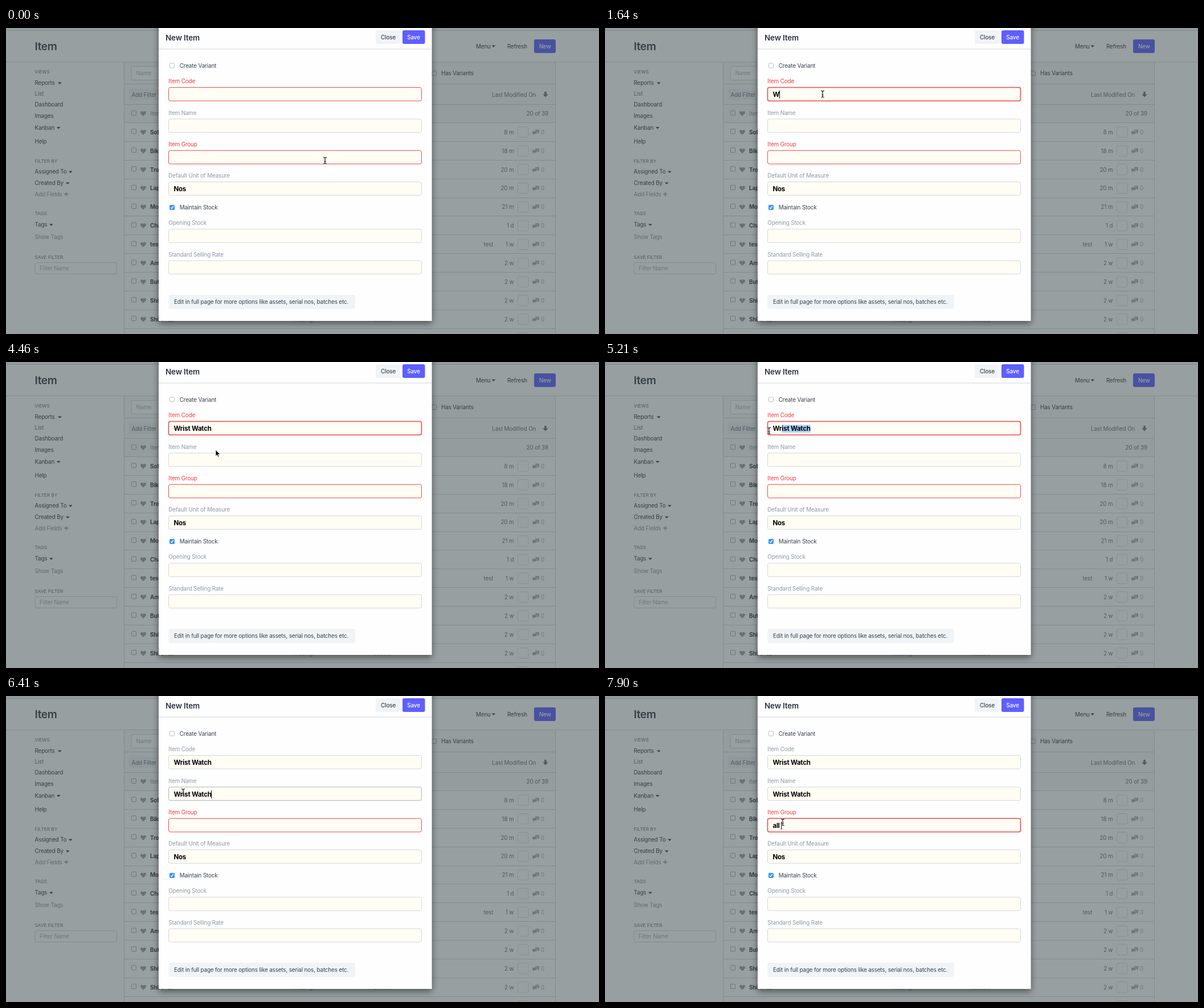
Animation, 1041 px wide and 538 px high, one loop 8000 ms. Source, as an HTML page:

```html
<!DOCTYPE html>
<html lang="en">
<head>
<meta charset="utf-8">
<title>New item form</title>
<style>
html, body { margin: 0; width: 100%; height: 100%; overflow: hidden; background: #99a0a1; }
svg { display: block; width: 1041px; height: 538px; }
text { font: 400 9.87px Inter, sans-serif; letter-spacing: -.014em; fill: #36414c; white-space: pre; }
.bold { font-weight: 700; }
.mid { font-weight: 500; }
.soft { fill: #6c7680; }
.muted { fill: #8d99a6; }
.pale { fill: #a9b4be; }
.white { fill: #fff; }
.red { fill: #f03a3d; }
.caps { font-size: 8.23px; letter-spacing: 0; fill: #6c7680; }
.page { font-size: 19px; font-weight: 600; letter-spacing: -.02em; }
.title { font-size: 13.5px; font-weight: 600; fill: #2b3540; }
.value { font-size: 11.5px; font-weight: 700; letter-spacing: -.02em; fill: #000; }
</style>
</head>
<body>
<svg id="stage" viewBox="0 0 1041 538" xmlns="http://www.w3.org/2000/svg"></svg>
<script>
const LOOP = 8000;
const stage = document.getElementById('stage');

const rect = (x, y, w, h, fill, extra = '') =>
  `<rect x="${x}" y="${y}" width="${w}" height="${h}" fill="${fill}" ${extra}/>`;
const box = (x, y, w, h, fill, stroke, r = 3, extra = '') =>
  rect(x, y, w, h, fill, `rx="${r}" stroke="${stroke}" ${extra}`);
const path = (d, fill, extra = '') => `<path d="${d}" fill="${fill}" ${extra}/>`;
const line = (x, y, w) => rect(x, y, w, 1, '#d1d8dd');
// y is the middle of the capitals
const text = (x, y, str, cls = '', extra = '') =>
  `<text x="${x}" y="${y + 3.5}" class="${cls}" ${extra}>${str}</text>`;
const right = (x, y, str, cls) => text(x, y, str, cls, 'text-anchor="end"');
const caretDown = (x, y) => path(`M${x} ${y}h6.6l-3.3 3.4z`, '#36414c');
const heart = (x, y) => path(
  `M${x} ${y + 4.6}l-4.2-4.3c-2-2.4.2-5 2.2-4.4 1 .2 1.6.9 2 1.6.4-.7 1-1.4 2-1.6 2-.6 4.2 2 2.2 4.4z`, '#9aa5b0');
const tick = (x, y) => box(x, y, 8, 8, 'none', '#a4abb0', 1);

function sidebar() {
  const rows = [
    [77, 'VIEWS', 'caps'], [96.5, 'Reports', '', 91], [115.5, 'List', 'soft'], [134.5, 'Dashboard'],
    [154, 'Images'], [175, 'Kanban', '', 89], [199.5, 'Help'],
    [234, 'FILTER BY', 'caps'], [252.5, 'Assigned To', '', 110], [272.5, 'Created By', '', 105],
    [292, 'Add Fields', 'muted'],
    [326, 'TAGS', 'caps'], [345.5, 'Tags', '', 76], [367, 'Show Tags', 'muted'],
    [403, 'SAVE FILTER', 'caps']
  ];
  return rows.map(([y, str, cls, arrow]) =>
      text(50.5, y - (cls === 'caps' ? .5 : 0), str, cls) + (arrow ? caretDown(arrow, y - 1) : '')).join('') +
    path('M102 292h7.4M105.7 288.3v7.4', 'none', 'stroke="#8d99a6" stroke-width="1.3"') +
    box(51, 412.5, 143.5, 20, '#fff', '#d1d8dd') + text(59, 422.5, 'Filter Name', 'pale');
}

function listRow(name, age, i) {
  const y = 183.3 + 32.88 * i;
  return line(208, Math.round(y + 15.6), 757) +
    tick(220.5, y - 5.5) + heart(241, y) +
    text(253, y, name, 'bold') + right(891.5, y, age, 'soft') +
    box(898.5, y - 9.5, 18.5, 18.5, 'none', '#c3cbd2', 3, 'stroke-dasharray="2 1.4"') +
    path(`M929 ${y - 4.5}h7v5.5h-1v2l-2-2h-4z`, '#b0bac3') +
    path(`M924 ${y - 2}h7.5v5h-4l-2.3 2.2v-2.2h-1.2z`, '#a4afb9', 'stroke="#fff" stroke-width=".5"') +
    text(939, y, '0', 'pale');
}

function page() {
  const items = [['Sofa', '8 m'], ['Bike', '18 m'], ['Trousers', '20 m'], ['Laptop', '20 m'],
    ['Mobile', '21 m'], ['Chair', '1 d'], ['test', '1 w'], ['Amplifier', '2 w'], ['Butter', '2 w'],
    ['Shirt', '2 w'], ['Shirt - M', '2 w'], ['Shirt - S', '2 w']];
  return rect(0, 0, 1041, 538, '#fff') +
    rect(0, 0, 1041, 4, '#f5f7fa') + line(0, 4, 1041) + line(0, 59, 1041) +
    text(50.5, 35, 'Item', 'page') +
    text(825, 32, 'Menu') + caretDown(852.5, 30.5) + text(880, 32, 'Refresh') +
    rect(927, 20, 38, 24, '#5e64ff', 'rx="3"') + text(936, 32, 'New', 'white mid') +
    sidebar() +
    rect(208, 60, 757, 106, '#f7fafc') +
    rect(207, 60, 1, 478, '#d1d8dd') + rect(964, 60, 1, 478, '#d1d8dd') +
    box(220, 67.5, 120, 24, '#fff', '#d1d8dd') + text(228.5, 79.5, 'Name', 'pale') +
    tick(747.5, 75.5) + text(764, 79.5, 'Has Variants') +
    line(208, 98, 757) + rect(216, 107, 60, 19, '#eef2f5', 'rx="3"') + text(220.5, 117, 'Add Filter', 'soft') +
    text(853, 117, 'Last Modified On', 'soft') +
    path('M945.3 112h3.4v4.5h3l-4.7 5-4.7-5h3z', '#6c7680') +
    line(208, 134, 757) + tick(220.5, 145.5) + heart(241, 150.5) +
    text(253, 150.5, 'Item Name', 'muted') + right(952, 150.5, '20 of 39', 'soft') +
    line(208, 166, 757) +
    items.map(([name, age], i) => listRow(name, age, i)).join('') +
    text(838.5, 380.6, 'test', 'soft') +
    text(504, 512, 'Trading', 'muted') + text(636, 512, 'Products', 'muted') +
    rect(0, 0, 1041, 538, '#334143', 'opacity=".5"');
}

const fields = [
  { id: 'code', y: 104.5, label: 'Item Code' },
  { id: 'name', y: 160, label: 'Item Name' },
  { id: 'group', y: 215.3, label: 'Item Group' },
  { id: 'unit', y: 270.5, label: 'Default Unit of Measure', value: 'Nos' },
  { id: 'stock', y: 353.7, label: 'Opening Stock' },
  { id: 'rate', y: 409, label: 'Standard Selling Rate' }
];

const field = f => `<g id="${f.id}">` +
  text(285.3, f.y - 10.8, f.label, 'muted') +
  box(285.5, f.y, 444, 23.7, '#fffdf4', '#d1d8dd') +
  rect(0, f.y + 6, 0, 13.5, '#add1fa', 'class="mark"') +
  text(294.5, f.y + 13.1, f.value || '', 'value') + '</g>';

function dialog() {
  return rect(268, -20, 479.5, 535, '#fefefe', 'filter="url(#shade)"') +
    line(268, 36.5, 479.5) + text(280, 18, 'New Item', 'title') +
    rect(649, 4, 43.5, 24, '#f0f4f7', 'rx="3"') + text(658, 16, 'Close', 'mid') +
    rect(696, 4, 39.5, 24, '#5e5fff', 'rx="3"') + text(704.3, 16, 'Save', 'white mid') +
    box(287.5, 62, 8, 8, '#fff', '#b9bdc1', 1.5) + text(304.7, 66, 'Create Variant') +
    fields.map(field).join('') +
    rect(287, 311, 9, 9, '#3b95f3', 'rx="1.8"') +
    path('M289.2 315.7l1.7 1.8 3-4.4', 'none', 'stroke="#fff" stroke-width="1.3"') +
    text(304.7, 315.3, 'Maintain Stock') +
    rect(285.3, 469, 327.5, 25, '#f0f4f7', 'rx="3"') +
    text(295, 481.8, 'Edit in full page for more options like assets, serial nos, batches etc.');
}

const beam = 'M-2.8-5.6q2.3 0 2.8 1.2q.5-1.2 2.8-1.2M0-4.4v9M-2.8 5.8q2.3 0 2.8-1.2q.5 1.2 2.8 1.2M-1.5 1.8h3';
stage.innerHTML = `<defs><filter id="shade" x="-10%" y="-10%" width="120%" height="120%">
  <feDropShadow dx="0" dy="4" stdDeviation="6" flood-color="#000" flood-opacity=".5"/></filter></defs>` +
  page() + dialog() + rect(0, 0, 1, 14, '#000', 'id="caret"') +
  '<g id="pointer"><g id="beam">' +
  path(beam, 'none', 'stroke="#fff" stroke-width="2.4" opacity=".7"') +
  path(beam, 'none', 'stroke="#000" stroke-width="1.1"') + '</g>' +
  path('M0 0V11l2.5-2.3 1.6 3.8 1.9-.8-1.6-3.7h3.6z', '#000', 'id="arrow" stroke="#fff" stroke-width=".8"') + '</g>';

const $ = id => document.getElementById(id);
const parts = {};
for (const { id, y } of fields) {
  const g = $(id);
  parts[id] = { y, label: g.children[0], frame: g.children[1], mark: g.children[2], value: g.children[3] };
}

// [time, x, y] of the pointer; each place holds until the next
const moves = [
  [0, 560, 233], [140, 552, 247], [290, 518, 222], [440, 452, 168], [590, 392, 122], [740, 382, 116],
  [4170, 380, 131], [4310, 373, 148], [4460, 368, 154.5], [4610, 366, 140], [4760, 364, 120],
  [4910, 346, 119], [5060, 312, 120], [5210, 288, 121], [5510, 284.5, 127.5],
  [5810, 287, 138], [5960, 299, 154], [6110, 309, 167], [6260, 311, 169],
  [6550, 311, 180], [6700, 312, 203], [6850, 312, 222]
];
// [time, first selected character]
const drags = [[4910, 9], [5060, 6], [5210, 2], [5360, 1], [5510, 0]];
const codeKeys = [1640, 1940, 2090, 2240, 2390, 2540, 2840, 2980, 3280, 3430, 3730];
const groupKeys = [7450, 7600, 7750, 7900];
const CODE_FOCUS = 740, NAME_FOCUS = 6260, GROUP_FOCUS = 7000;

const latest = (list, t) => list.filter(k => k[0] <= t).pop();
const typed = (str, keys, t) => str.slice(0, keys.filter(k => k <= t).length);
const setAll = (el, attrs) => { for (const k in attrs) el.setAttribute(k, attrs[k]); };
const show = (el, on) => el.setAttribute('visibility', on ? 'visible' : 'hidden');

function paint(id, str, error, focus) {
  const p = parts[id];
  if (p.value.textContent !== str) p.value.textContent = str;
  p.label.setAttribute('class', error ? 'red' : 'muted');
  setAll(p.frame, {
    stroke: error ? '#f04a4c' : focus ? '#aab3bb' : '#d1d8dd',
    'stroke-width': error && focus ? 1.6 : 1
  });
}

function caretOn(t) {
  if (t < CODE_FOCUS) return false;
  if (t < codeKeys[0]) return t < 1190;
  if (t < NAME_FOCUS) return t < 4170;
  if (t < GROUP_FOCUS) return t < 6850;
  return true;
}

function render(t) {
  const active = t < CODE_FOCUS ? '' : t < NAME_FOCUS ? 'code' : t < GROUP_FOCUS ? 'name' : 'group';
  paint('code', typed('Wrist Watch', codeKeys, t), t < NAME_FOCUS, active === 'code');
  paint('name', t < NAME_FOCUS ? '' : 'Wrist Watch', false, active === 'name');
  paint('group', typed('all ', groupKeys, t), true, active === 'group');

  const { mark, value } = parts.code;
  const drag = t < NAME_FOCUS && latest(drags, t);
  let width = 0;
  if (drag) {
    const x = value.getStartPositionOfChar(drag[1]).x;
    width = 294.5 + value.getComputedTextLength() - x;
    mark.setAttribute('x', x);
  }
  mark.setAttribute('width', Math.max(0, width));

  show($('caret'), caretOn(t));
  if (active) {
    const p = parts[active];
    const len = p.value.textContent ? p.value.getComputedTextLength() : 0;
    setAll($('caret'), { x: Math.round(294 + len), y: Math.round(p.y + 5.5) });
  }

  const [, x, y] = latest(moves, t);
  const inField = fields.some(f => y > f.y && y < f.y + 24);
  $('pointer').setAttribute('transform', `translate(${x} ${y})`);
  show($('beam'), inField);
  show($('arrow'), !inField);
}

const start = performance.now();
function tickFrame() {
  render((performance.now() - start) % LOOP);
  requestAnimationFrame(tickFrame);
}
tickFrame();
</script>
</body>
</html>
```
